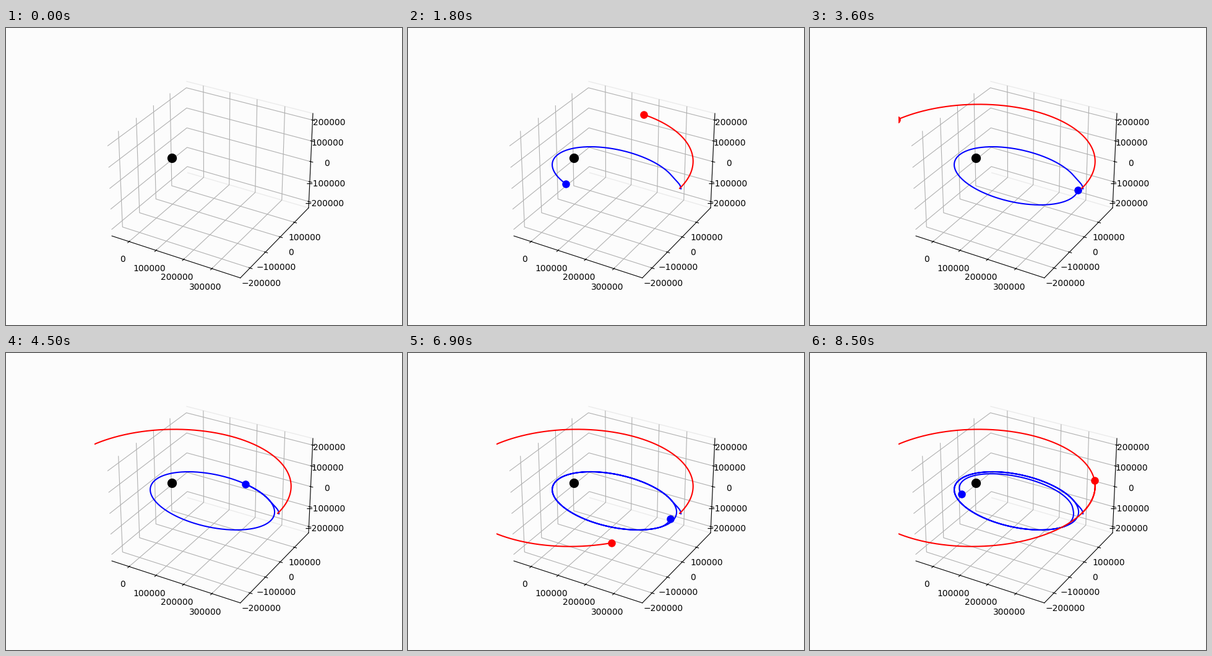
These frames come from a looping animation (640x480 px, 8.6 s). A matplotlib script:

```python
import numpy as np
import matplotlib.pyplot as plt
from matplotlib.animation import FuncAnimation

FRAMES = 86
SUB = 12           # path samples per frame
PAPER = "#fcfcfc"
MOON_R = 384.4e3   # km


def ease(t, start, end):
    s = np.clip((t - start) / (end - start), 0, 1)
    return s * s * (3 - 2 * s)


def moon_path(t):
    ang = np.radians(np.maximum(0, 4.62 * t - 0.3))
    return MOON_R * np.cos(ang), MOON_R * np.sin(ang)


def probe_path(t):
    """Kepler ellipse, reshaped as the probe leaves and meets the moon."""
    leave = 1 - ease(t, 0, 6)
    meet = ease(t, 65, 73)
    p = 98.2e3 - 20.4e3 * meet
    e = 0.7485 + 0.0105 * leave + 0.0375 * meet
    turn = np.radians(170 + 2.8 * meet)
    mean = np.radians(10.3 * (t - 15.1) + 21.5 * leave
                      - 5 * ease(t, 62, 69) + 17 * ease(t, 73, 85))

    ecc = mean + e * np.sin(mean)
    for _ in range(40):  # damped Newton steps for Kepler's equation
        step = (ecc - e * np.sin(ecc) - mean) / (1 - e * np.cos(ecc))
        ecc = ecc - np.clip(step, -0.5, 0.5)

    a = p / (1 - e ** 2)
    u = a * (np.cos(ecc) - e)
    v = a * np.sqrt(1 - e ** 2) * np.sin(ecc)
    return (u * np.cos(turn) - v * np.sin(turn),
            u * np.sin(turn) + v * np.cos(turn))


fig = plt.figure(figsize=(6.4, 4.8), dpi=100, facecolor=PAPER)
ax = fig.add_subplot(projection="3d", facecolor=PAPER)

half = 231.8e3
ax.set_xlim(166.8e3 - half, 166.8e3 + half)
ax.set_ylim(-29e3 - half, -29e3 + half)
ax.set_zlim(-0.3e3 - half, -0.3e3 + half)
ax.set_xticks(np.arange(0, 4) * 100000)
ax.set_yticks(np.arange(-2, 2) * 100000)
ax.set_zticks(np.arange(-2, 3) * 100000)

# Only the back wall keeps a faint outline.
ax.xaxis.set_pane_color((1, 1, 1, 0))
ax.zaxis.set_pane_color((1, 1, 1, 0))
ax.yaxis.set_pane_color(PAPER)
ax.yaxis.pane.set_edgecolor("#ebebeb")

ax.plot([0], [0], [0], "o", color="black", markersize=10)

times = np.arange((FRAMES - 1) * SUB + 1) / SUB
bodies = []
for path, color in ((probe_path, "blue"), (moon_path, "red")):
    trail, = ax.plot([], [], [], color=color, lw=1.5)
    dot, = ax.plot([], [], [], "o", color=color, markersize=8)
    bodies.append((*path(times), trail, dot))


def draw(i):
    n = i * SUB + 1 if i else 0
    m = max(n - 1, 0)
    for x, y, trail, dot in bodies:
        trail.set_data_3d(x[:n], y[:n], np.zeros(n))
        dot.set_data_3d(x[m:n], y[m:n], np.zeros(n - m))
    return [artist for body in bodies for artist in body[2:]]


anim = FuncAnimation(fig, draw, frames=FRAMES, init_func=lambda: draw(0),
                     interval=100, repeat=True, repeat_delay=0, blit=False)
plt.show()
```
